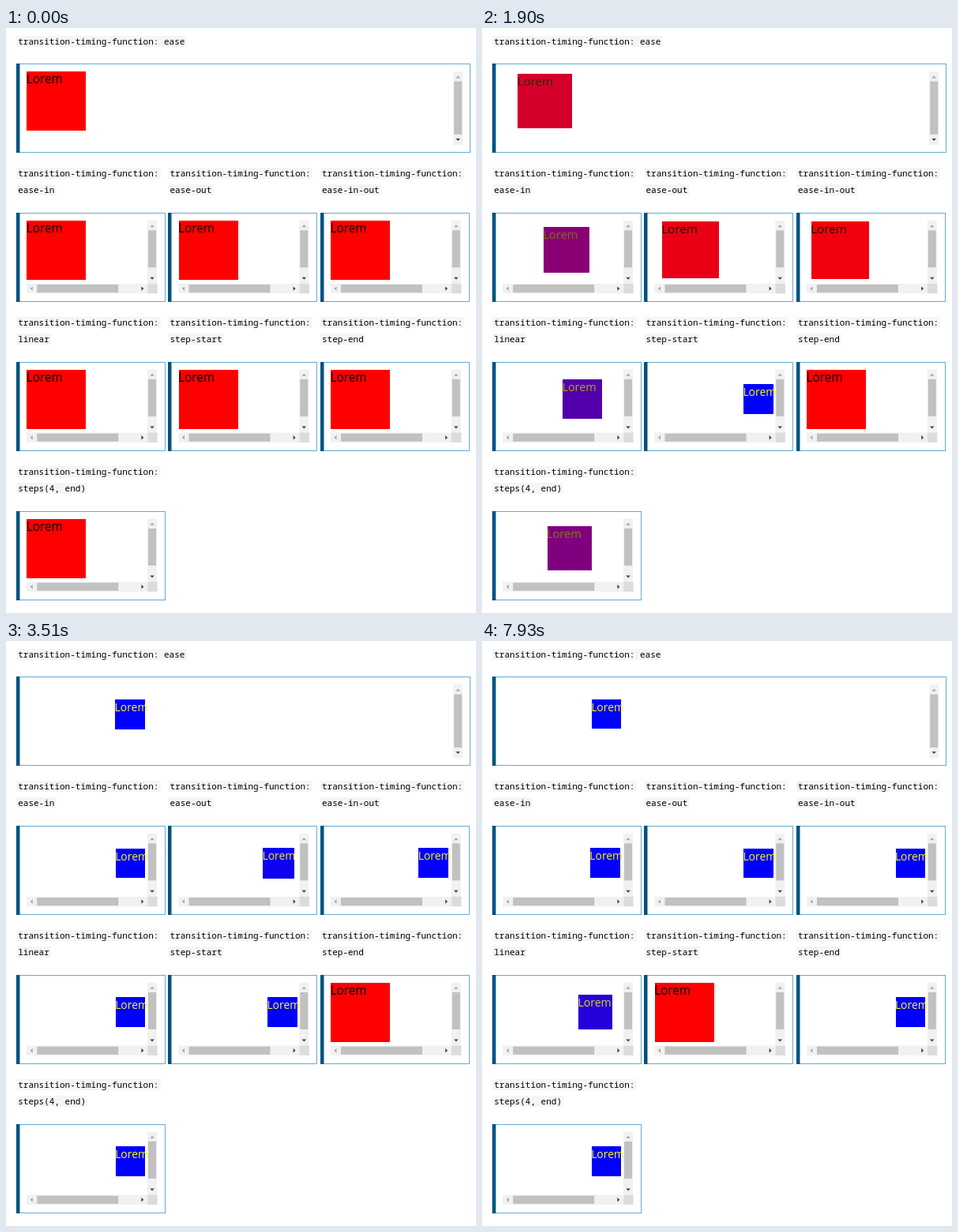
An HTML page for the animation above (8 s loop, 595 px wide and 741 px high).

```html
<!DOCTYPE html>
<html lang="en">
<head>
<meta charset="utf-8">
<title>Transition timing functions</title>
<style>
  html, body { margin: 0; width: 100%; height: 100%; overflow: hidden; background: #fff; }
  #stage { position: absolute; left: 0; top: 0; width: 595px; height: 741px; overflow: hidden; }
  svg { position: absolute; left: 0; top: 0; }
  text { font: 11px "Noto Sans Mono", "DejaVu Sans Mono", monospace; fill: #000; white-space: pre; }
  .view { position: absolute; overflow: hidden; }
  .box {
    position: absolute; white-space: nowrap; text-indent: -.6px;
    font-family: "Open Sans", "Noto Sans", sans-serif; line-height: 19.5px;
  }
</style>
</head>
<body>
<div id="stage"><svg id="art" width="595" height="741"></svg></div>
<script>
const LOOP = 8000, SPAN = 12000, MOVE = 2100, REPEAT = 7132, STEP = 70;
const stage = document.getElementById('stage');
const art = document.getElementById('art');

const panelX = [13, 205, 398], panelY = [45, 234, 423, 612];
const viewX = [26.25, 218.5, 411], viewY = [55.2, 243.9, 432.5, 621.5];
const textX = [15.2, 207.5, 400], textY = [21, 188, 377, 566];

// easing, column, row, start time in ms
const demos = [
  ['ease', 0, 0, 1602],
  ['ease-in', 0, 1, 590],
  ['ease-out', 1, 1, 1795],
  ['ease-in-out', 2, 1, 1566],
  ['linear', 0, 2, 485],
  ['step-start', 1, 2, 640],
  ['step-end', 2, 2, 2090],
  ['steps(4, end)', 0, 3, 470]
];

const rect = (x, y, w, h, fill) =>
  `<rect x="${x}" y="${y}" width="${w}" height="${h}" fill="${fill}"/>`;

const label = (x, y, str) =>
  rect(x - 2, y - 11, str.length * 6.6 + 4, 14, '#f5f5f5') +
  `<text x="${x}" y="${y}">${str}</text>`;

const arrow = (x, y, turn, fill) =>
  `<path d="M-2.7 1.5L0-1.5L2.7 1.5Z" fill="${fill}" transform="translate(${x} ${y}) rotate(${turn})"/>`;

function panel(x, y, w) {
  const line = '#62acd3';
  return rect(x, y, w, 1, line) + rect(x, y + 112, w, 1, line) +
    rect(x + w - 1, y, 1, 113, line) + rect(x, y, 4.5, 113, '#005282');
}

function vBar(x, y, h, thumb) {
  return rect(x, y, 12, h, '#f1f1f1') + rect(x + 1, y + 12.4, 10, thumb, '#c1c1c1') +
    arrow(x + 6, y + 6.8, 0, '#a3a3a3') + arrow(x + 6, y + h - 6.6, 180, '#404040');
}

function hBar(x, y) {
  return rect(x, y, 153, 12.4, '#f1f1f1') + rect(x + 13, y + 1.1, 103, 10.2, '#c1c1c1') +
    arrow(x + 6, y + 6.2, -90, '#a3a3a3') + arrow(x + 146.6, y + 6.2, 90, '#404040') +
    rect(x + 153, y, 12.4, 12.4, '#dcdcdc');
}

function drawDemo([name, col, row]) {
  const wide = row === 0, x = viewX[col], y = viewY[row];
  const head = 'transition-timing-function:';
  const words = wide
    ? label(textX[col], textY[row], head + ' ' + name)
    : label(textX[col], textY[row], head) + label(textX[col], textY[row] + 21, name);
  const bars = wide
    ? vBar(566.2, y, 93, 67.3)
    : vBar(x + 152.8, y, 80, 47) + hBar(x, y + 80);
  return words + panel(panelX[col], panelY[row], wide ? 575 : 189) + bars;
}

const pose = (x, y, p) => ({
  left: x + 112.5 * p + 'px',
  top: y + 18.75 * p + 'px',
  width: 75 - 37.5 * p + 'px',
  height: 75 - 37.5 * p + 'px',
  fontSize: 15.4 - 1.5 * p + 'px',
  backgroundColor: p ? '#0000ff' : '#ff0000',
  color: p ? '#ffff00' : '#000000'
});

function addBox([easing, col, row, start]) {
  const left = Math.floor(viewX[col]), top = Math.floor(viewY[row]);
  const view = document.createElement('div');
  view.className = 'view';
  Object.assign(view.style, {
    left: left + 'px', top: top + 'px',
    width: (row ? 153 : 540) + 'px', height: (row ? 81 : 93) + 'px'
  });
  const box = document.createElement('div');
  box.className = 'box';
  box.textContent = 'Lorem';
  view.append(box);
  stage.append(view);

  const x = viewX[col] - left, y = viewY[row] - top;
  const from = pose(x, y, 0), to = pose(x, y, 1);
  const key = (time, look, ease = 'linear') => ({ ...look, offset: time / SPAN, easing: ease });
  const back = start + REPEAT;
  const anim = box.animate([
    key(0, from),
    key(start, from, easing),
    key(start + MOVE, to),
    key(back, to, easing),
    key(back + MOVE, from),
    key(SPAN, from)
  ], { duration: SPAN, fill: 'both' });
  anim.pause();
  return anim;
}

// The picture advances in 70 ms ticks with long rests between them.
function tick(t) {
  const grid = base => base + Math.floor((t - base) / STEP) * STEP;
  if (t < 500) return 0;
  if (t < 4200) return Math.min(3930, grid(500));
  if (t < 7650) return 4200;
  return grid(7650);
}

art.innerHTML = demos.map(drawDemo).join('');
const anims = demos.map(addBox);
const begin = performance.now();

function render() {
  const t = tick(Math.max(0, performance.now() - begin) % LOOP);
  for (const a of anims) a.currentTime = t;
  requestAnimationFrame(render);
}
render();
</script>
</body>
</html>
```
